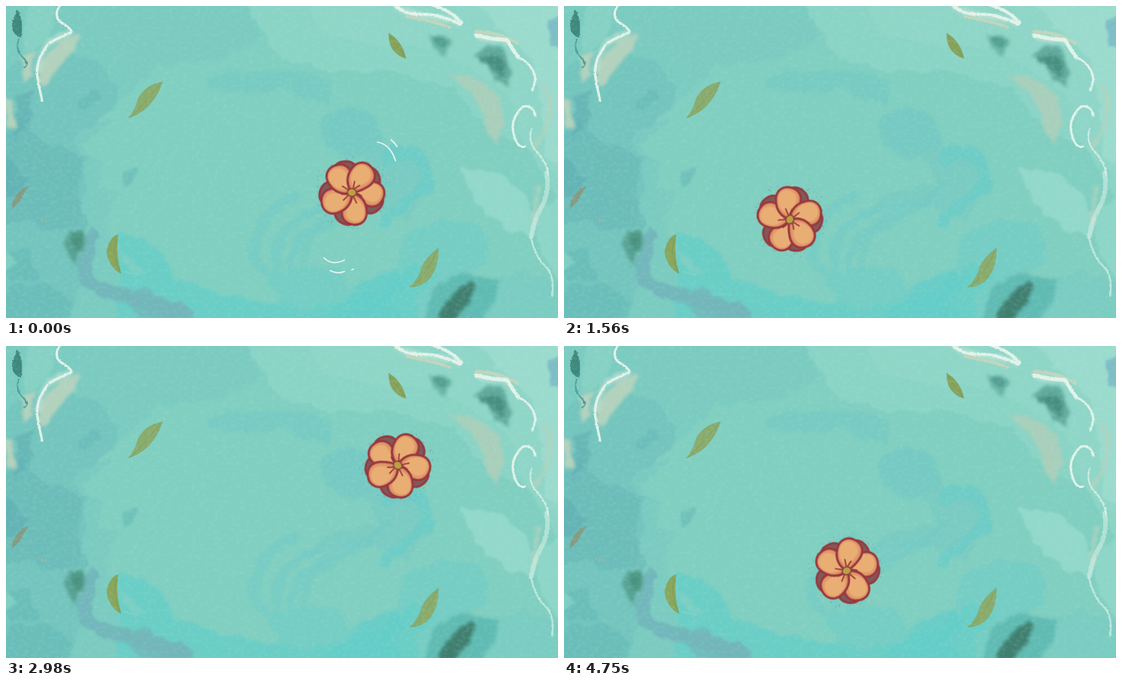
These frames come from a looping animation (734x415 px, 4.77 s). An HTML page:

```html
<!DOCTYPE html>
<html lang="en">
<head>
<meta charset="utf-8">
<title>Drifting flower</title>
<style>
html, body { margin: 0; width: 100%; height: 100%; overflow: hidden; background: #80cfc1; }
svg { position: absolute; left: 0; top: 0; width: 100%; height: 100%; display: block; }
#water { will-change: transform; }
</style>
</head>
<body>
<svg id="water" viewBox="0 0 734 415">
  <defs>
    <filter id="rough" filterUnits="userSpaceOnUse" x="-20" y="-20" width="774" height="455" color-interpolation-filters="sRGB">
      <feTurbulence type="fractalNoise" baseFrequency=".045" numOctaves="4" seed="4"/>
      <feDisplacementMap in="SourceGraphic" scale="16" xChannelSelector="R" yChannelSelector="G"/>
      <feGaussianBlur stdDeviation="1.6"/>
    </filter>
    <filter id="soft" filterUnits="userSpaceOnUse" x="-20" y="-20" width="774" height="455" color-interpolation-filters="sRGB">
      <feTurbulence type="fractalNoise" baseFrequency=".08" numOctaves="3" seed="6"/>
      <feDisplacementMap in="SourceGraphic" scale="9" xChannelSelector="R" yChannelSelector="G"/>
      <feGaussianBlur stdDeviation="2.2"/>
    </filter>
    <filter id="chalk" filterUnits="userSpaceOnUse" x="-20" y="-20" width="774" height="455" color-interpolation-filters="sRGB">
      <feTurbulence type="fractalNoise" baseFrequency=".4" numOctaves="2" seed="9"/>
      <feDisplacementMap in="SourceGraphic" scale="3" xChannelSelector="R" yChannelSelector="G"/>
      <feGaussianBlur stdDeviation=".6"/>
    </filter>
    <filter id="grain" x="0" y="0" width="100%" height="100%" color-interpolation-filters="sRGB">
      <feTurbulence type="fractalNoise" baseFrequency=".17 .22" numOctaves="2" seed="2"/>
      <feColorMatrix values="0 0 0 0 .72  0 0 0 0 .93  0 0 0 0 .86  1.6 0 0 0 -.7"/>
    </filter>
  </defs>
  <rect width="734" height="415" fill="#80cfc1"/>

  <g filter="url(#rough)">
    <!-- left shallows -->
    <path fill="#7bcbc1" d="M-20-20H330L340 40 290 70 200 80 150 130 170 200 150 240 130 300 190 330 225 375 330 395V440H-20Z"/>
    <path fill="#74c5be" d="M-20 90 50 60 120 70 150 110 140 150 95 180 110 240 90 300 110 360 60 440H-20Z"/>
    <path fill="#80cfc1" d="M150 130Q85 170 100 200Q130 210 120 240L190 260 220 170Z"/>
    <path fill="#7acac1" d="M92 180Q105 160 138 148L145 156Q105 175 104 195L128 210 118 214 95 200Z"/>
    <path fill="#69bbb9" d="M-20 180 20 150 50 180 105 200 95 250 110 290 60 300 20 285-20 300Z" opacity=".65"/>
    <path fill="#5daeb3" d="M-20 205 8 200 18 225 35 230 15 250-20 265ZM10 120 36 110 32 150 12 180Z" opacity=".55"/>
    <path fill="#6abcb8" d="M95 138Q100 115 120 107L124 120 108 140ZM155 220 175 213 170 235 158 240Z" opacity=".75"/>
    <path fill="#66bcb9" d="M-20 335 30 320 45 360 10 372ZM-20 385 50 365 90 395 80 440H-20Z" opacity=".65"/>
    <path fill="#8ad4c7" d="M28 0 70-8 62 25 50 48 22 60ZM-10 318 14 340-10 360Z" opacity=".7"/>

    <!-- top right light water -->
    <path fill="#8ad4c6" d="M310-20 345 42 365 72 440 88 520 86 560 102 600 118 640 165 690 185 734 260 760 260V-20Z"/>
    <path fill="#91d8ca" d="M395-20 420 35 490 52 560 50 625 85 670 120 690 190 760 250V-20Z" opacity=".8"/>
    <path fill="#a3dfd3" d="M600-20 660 30 700 70 712 130 720 200 760 220V-20Z" opacity=".6"/>
    <path fill="#80cfc1" d="M535 92 595 108 620 140 655 190 620 180 570 140Z"/>
    <path fill="#92d8cb" d="M603 216 655 222 690 255 710 285 700 307 665 295 625 260Z"/>
    <path fill="#8dd6c8" d="M712 265 745 250V370L722 350 706 312Z"/>
    <path fill="#7dbdc6" d="M722 18 760 5V65L728 52Z"/>

    <!-- deeper bands and swirls -->
    <path fill="#77cac2" d="M267 96Q290 84 345 88 400 80 432 102L433 128 415 128 380 112 310 114 270 112Z" opacity=".85"/>
    <path fill="#75c9c3" d="M420 150Q445 122 480 140 505 160 505 188L470 205 440 198Q415 180 420 150Z" opacity=".85"/>
    <path fill="#78cac2" d="M470 195 520 185 565 205 566 240 535 285 480 265 400 275 430 250 500 235Z" opacity=".8"/>
    <g fill="none" stroke-linecap="round" opacity=".75">
      <path stroke="#6accc8" stroke-width="17" d="M505 200Q540 185 555 212T538 258L505 285"/>
      <path stroke="#74cbc5" stroke-width="11" d="M385 253Q320 285 332 335Q340 352 350 360M420 268Q345 300 360 355M470 262Q370 300 378 360"/>
      <path stroke="#74cbc5" stroke-width="9" d="M505 235Q470 280 420 292Q385 310 400 360" opacity=".8"/>
    </g>
    <path fill="#75cdc4" d="M345 355 440 345 455 375 520 350 530 305 575 285 620 288 640 315 638 345 575 370 560 440H290L360 390Z"/>
    <path fill="#6acec6" d="M150 304Q185 300 212 335L225 365 300 386 400 402 490 380 540 345 570 355 545 390 560 440H140L150 375Z"/>
    <path fill="#64cec9" d="M455 382 520 345 535 370 510 390 550 440H410Z" opacity=".7"/>
    <path fill="#7ccfc4" d="M152 330Q175 335 190 358L165 355Z"/>
    <path fill="#7acbc2" d="M620 380 690 350 760 380V440H610Z" opacity=".8"/>

    <path fill="none" stroke="#72b7bb" stroke-width="18" d="M108 298Q118 320 103 345 105 372 145 382T250 412"/>
    <path fill="#72b7bb" d="M150 372 190 378 250 405 210 425 160 400Z" opacity=".8"/>
  </g>

  <g filter="url(#soft)">
    <!-- reeds and rocks -->
    <path fill="#57a192" d="M82 300 102 297 106 312 103 328 94 330 90 350 84 325 78 318Z"/>
    <path fill="#418b78" d="M88 303 101 300 101 320 90 322Z" opacity=".7"/>
    <path fill="#69b5a6" d="M562 38 592 42 595 52 580 68 570 55Z"/>
    <path fill="#519c8f" d="M565 40 588 44 582 60Z"/>
    <path fill="#61aa9c" d="M622 68 640 54 662 56 672 90 666 108 650 98 642 80Z"/>
    <path fill="#458b7e" d="M626 70 648 62 664 72 662 96 650 84Z" opacity=".85"/>
    <path fill="#5bb8b1" d="M568 375 605 355 655 365 650 390 625 425H555Z" opacity=".85"/>
    <path fill="#407f70" d="M574 408 592 385 618 365 625 378 610 402 594 420 578 420Z"/>

    <!-- sand -->
    <path fill="#a9cfbb" d="M588 90 628 98 656 118 662 150 655 184 640 168 632 138 618 115Z"/>
    <path fill="#b3d2bd" d="M72 45 98 36 92 55 72 80 52 108 42 102 46 75ZM20 68 38 60 34 90 24 104ZM-5 118 8 128 14 165 2 162Z"/>
    <path fill="none" stroke="#b2d2bf" stroke-width="6" d="M712 105Q728 120 722 145T700 190M710 240Q700 260 704 290" opacity=".8"/>
    <path fill="none" stroke="#d5e9da" stroke-width="8" d="M88 33Q68 40 56 52T42 88M518 3Q550 13 605 22M626 40 668 46" opacity=".55"/>
  </g>

  <g filter="url(#chalk)">
    <path fill="#3f887d" d="M15 4Q24 18 20 42Q7 38 8 23Z"/>
    <path fill="none" stroke="#4e9f98" stroke-width="2" d="M17 44Q12 58 22 68T24 82"/>
    <path fill="#869a81" d="M7 271Q10 246 31 239Q22 251 18 260Z"/>
    <path fill="none" stroke="#a3b79e" stroke-width="3" stroke-dasharray="2 3" d="M42 282 56 286"/>
    <g fill="none" stroke-linecap="round" stroke-linejoin="round">
      <path stroke="#c2d5bc" stroke-width="4" d="M533 14Q560 18 590 28M625 34Q655 34 680 50"/>
      <g stroke="#e3f3ea">
        <path stroke-width="3.2" d="M71 0Q62 15 75 23T87 35Q70 42 58 49M55 52Q38 75 42 96T48 126"/>
        <path stroke-width="4" d="M516-2Q530 12 552 11T604 24M565-2Q590 5 606 22"/>
        <path stroke-width="5" d="M625 39Q650 45 666 45Q673 57 681 68"/>
        <path stroke-width="3" d="M681 68Q702 78 704 98L700 112"/>
        <path stroke-width="3" d="M704 146Q700 130 687 134 670 150 675 170T690 187"/>
        <path stroke-width="2" d="M699 163Q693 180 706 194T721 224" opacity=".8"/>
        <path stroke-width="6" opacity=".5" d="M719 222Q723 248 712 267T699 306"/>
        <path stroke-width="2.5" opacity=".65" d="M698 308Q704 334 717 346T726 386"/>
      </g>
    </g>
  </g>

  <!-- leaves -->
  <g fill="#8aab6c" stroke="#7c9f66" stroke-width=".8" stroke-opacity=".6">
    <path d="M208 101Q198 130 178 142Q170 146 163 149Q173 136 176 123Q185 105 208 101Z"/>
    <path fill="#87a25a" d="M509 36Q527 47 532 70Q508 62 509 36Z"/>
    <path fill="#89a55a" d="M149 304Q145 331 153 356Q136 347 134 326Q138 307 149 304Z"/>
    <path d="M575 322Q575 350 561 365Q552 373 537 374Q550 362 553 347Q559 334 575 322Z"/>
    <path fill="none" stroke="#71904c" d="M205 104Q190 122 166 148M511 40 531 69M147 310Q140 330 152 354M573 326Q562 352 542 373"/>
    <path fill="none" stroke="#9bd8c5" stroke-width="1.2" d="M156 353 176 358M512 66 534 75"/>
  </g>
  <rect width="734" height="415" filter="url(#grain)" opacity=".22"/>
</svg>

<svg id="stage" viewBox="0 0 734 415">
  <defs>
    <path id="petal" d="M0 0C5-13 15-18 28-17C40-16 46-6 42 5C38 16 28 19 18 14C10 10 4 6 0 0Z"/>
    <filter id="paint" x="-20%" y="-20%" width="140%" height="140%" color-interpolation-filters="sRGB">
      <feTurbulence type="fractalNoise" baseFrequency=".35" numOctaves="1" seed="5"/>
      <feDisplacementMap in="SourceGraphic" scale="1.6" xChannelSelector="R" yChannelSelector="G"/>
    </filter>
  </defs>
  <g id="ripples" fill="none" stroke="#e6f6ef" stroke-width="1.7" stroke-linecap="round"></g>
  <g id="flower"><g id="bloom" filter="url(#paint)"></g></g>
</svg>

<script>
const LOOP = 4770, JUMP = 2760;
const NS = 'http://www.w3.org/2000/svg';
const $ = id => document.getElementById(id);

function add(parent, tag, attrs) {
  const el = document.createElementNS(NS, tag);
  for (const k in attrs) el.setAttribute(k, attrs[k]);
  parent.appendChild(el);
  return el;
}

// Drift keys: time, x, y
const drift = [[-420, 493, 211], [0, 460, 248], [330, 432, 273], [900, 376, 299], [1190, 340, 300],
  [1650, 292, 279], [1980, 270, 255], [2190, 263, 234], [2560, 267, 192], [2770, 273, 171]];
const entry = [[2750, 530, 125], [3020, 519, 164], [3310, 501, 201], [3430, 493, 211],
  [3850, 460, 248], [4180, 432, 273], [4750, 376, 299], [4780, 373, 299.5]];

function slope(keys, i, c) {
  const a = keys[Math.max(0, i - 1)], b = keys[Math.min(keys.length - 1, i + 1)];
  return (b[c] - a[c]) / (b[0] - a[0]);
}

function along(keys, t, c) {
  let i = 0;
  while (i < keys.length - 2 && t >= keys[i + 1][0]) i++;
  const a = keys[i], b = keys[i + 1], d = b[0] - a[0], u = (t - a[0]) / d, v = 1 - u;
  return v * v * (1 + 2 * u) * a[c] + u * u * (3 - 2 * u) * b[c]
    + d * u * v * (v * slope(keys, i, c) - u * slope(keys, i + 1, c));
}

// Bloom, centred on the origin
const bloom = $('bloom');
const angles = [0, 79, 151, 227, 297];
const petal = (turn, fill, stroke, width, shift = '') =>
  add(bloom, 'use', { href: '#petal', transform: `rotate(${turn})${shift}`, fill, stroke, 'stroke-width': width });
for (const a of angles) petal(a + 20, '#80595a', '#963a40', 3);
for (const a of angles) {
  petal(a, '#d58260', '#98373e', 2.8);
  petal(a, '#e19a69', 'none', 0, ' translate(4 -.5) scale(.86)');
  petal(a, '#e9ae74', 'none', 0, ' translate(8 -1.5) scale(.72)');
}
for (const a of angles) {
  add(bloom, 'path', { d: 'M3 0Q9-3 15-5M4 0Q10 1 14 4', transform: `rotate(${a})`, fill: 'none', stroke: '#98373e', 'stroke-width': 1.8 });
}
add(bloom, 'ellipse', { rx: 6, ry: 5.2, fill: '#bba044', stroke: '#8d4037', 'stroke-width': 1.6 });

let seed = 7;
const rnd = () => (seed = seed * 16807 % 2147483647) / 2147483647;
for (let i = 0; i < 46; i++) {
  const a = rnd() * 6.283, r = 45 + rnd() * rnd() * 8;
  add($('flower'), 'circle', { cx: r * Math.cos(a), cy: r * Math.sin(a), r: .55, fill: '#7d7468', opacity: .65 });
}

// Ripple groups: start, end, strokes
const lap = 'M494 181Q511 184 518 206M512 178Q517 182 520 187M423 335Q433 346 450 338M431 352Q441 357 450 353M460 351L462 350';
const ripples = [
  [-290, 50, lap],
  [1230, 1560, 'M385 243Q402 249 411 274M401 237Q408 242 412 250M298 348Q309 362 328 357M307 367Q318 371 329 368'],
  [2320, 2650, 'M203 139Q222 120 244 127M220 120Q232 112 242 115M291 279Q303 279 308 265M298 275L303 269'],
  [3540, 3868, lap]
].map(([from, to, d]) => ({
  from, to,
  lines: d.split(/(?=M)/).map(s => add($('ripples'), 'path', { d: s, pathLength: 100 }))
}));

const clamp = v => Math.max(0, Math.min(1, v));

function draw(t) {
  const keys = t < JUMP ? drift : entry;
  const x = along(keys, t, 1), y = along(keys, t, 2);
  $('flower').setAttribute('transform', `translate(${x.toFixed(2)} ${y.toFixed(2)}) rotate(${(5 + t * .071).toFixed(2)})`);
  for (const { from, to, lines } of ripples) {
    const u = (t - from) / (to - from), on = u > 0 && u < 1;
    const head = 100 * clamp(u / .4), tail = 100 * clamp((u - .86) / .14);
    for (const line of lines) {
      line.setAttribute('visibility', on ? 'visible' : 'hidden');
      line.setAttribute('stroke-dasharray', `0 ${tail.toFixed(1)} ${Math.max(0, head - tail).toFixed(1)} 200`);
    }
  }
}

const start = performance.now();
function tick() {
  draw((performance.now() - start) % LOOP);
  requestAnimationFrame(tick);
}
tick();
</script>
</body>
</html>
```
